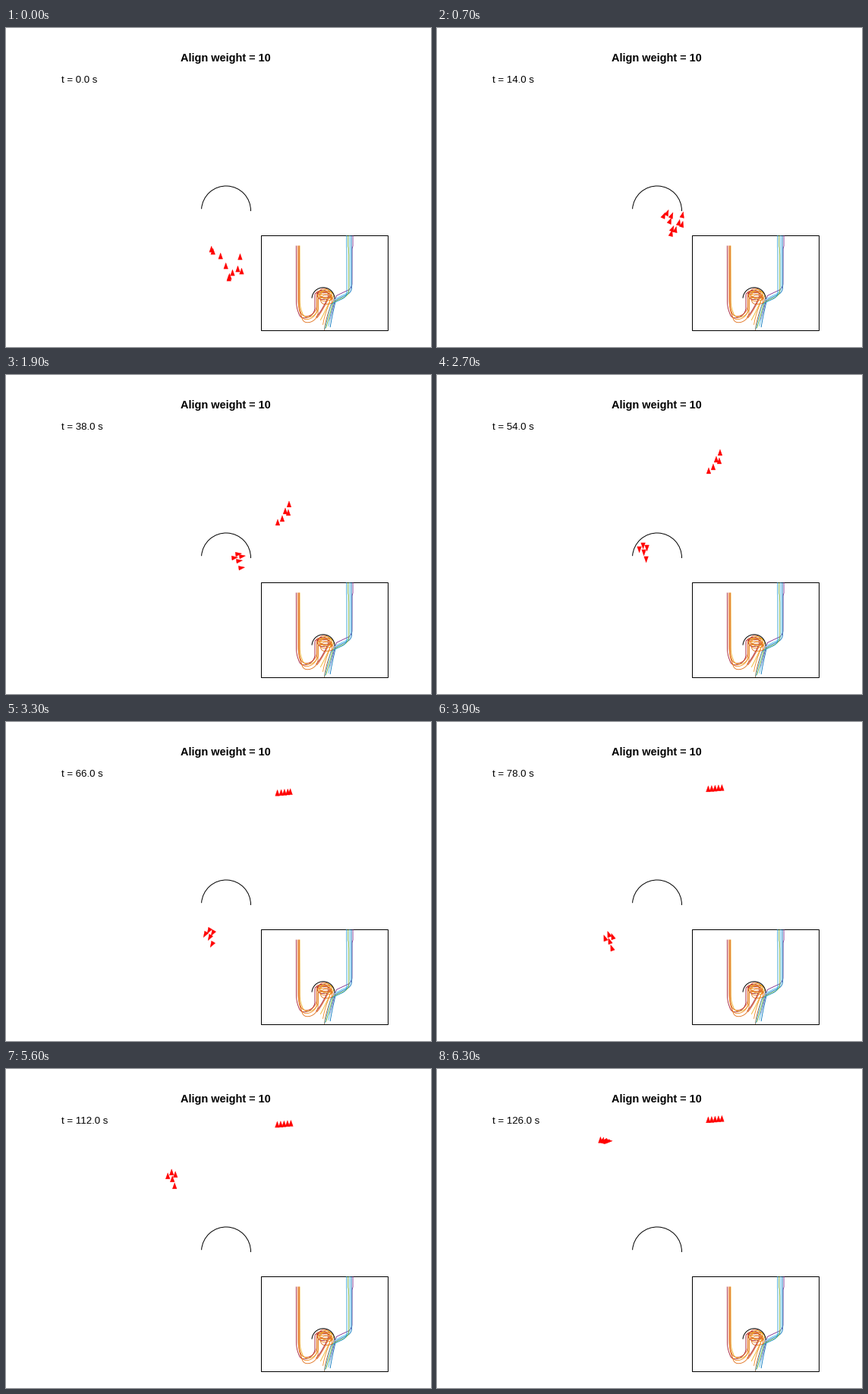
Recreate the animation shown at these times as a matplotlib script. Size 560 px wide and 420 px high, loop 6.4 s.

```python
import numpy as np
import matplotlib.pyplot as plt
from matplotlib.animation import FuncAnimation
from matplotlib.collections import PolyCollection
from matplotlib.patches import Arc, Rectangle

W, H, DPI = 560, 420, 100
FRAMES, INTERVAL = 64, 100
PX = 72 / DPI
SPEED = 8.5                    # pixels per frame
STEP = 0.25
SPRITE = np.array([[0, -4.4], [2.8, 3.5], [-2.8, 3.5]])


class Flock:
    """Five agents in formation on a path of straight and circular legs.

    Legs are (length, turn in degrees); headings run clockwise from up.
    At the end of the way the agents line up side by side.
    """

    def __init__(self, start, heading, legs, scatter, formation,
                 park, gap, rise, lineup, limit, turn):
        lengths, turns = np.transpose(legs)
        knots = np.append(0, np.cumsum(lengths))
        angles = np.radians(heading + np.append(0, np.cumsum(turns)))
        self.dist = np.arange(0, knots[-1], STEP)
        self.angle = np.interp(self.dist, knots, angles)
        self.x = start[0] + np.cumsum(np.sin(self.angle)) * STEP
        self.y = start[1] - np.cumsum(np.cos(self.angle)) * STEP

        self.scatter = np.array(scatter, float)
        self.formation = np.array(formation, float)
        self.rank = self.formation[:, 0].argsort().argsort()
        self.park_x = park + gap * self.rank
        self.rise = rise * self.rank
        self.lineup, self.limit = lineup, limit
        self.turns = np.radians(turn) * self.rank

    def along(self, t, values):
        return np.interp(SPEED * t, self.dist, values)

    def positions(self, t):
        loose = np.exp(-t / 4)
        pos = self.formation + loose * (self.scatter - self.formation)
        pos += [self.along(t, self.x), self.along(t, self.y)]
        blend = np.interp(t, self.lineup, [0, 1])
        pos[:, 0] += (self.park_x - pos[:, 0]) * blend
        pos[:, 1] = np.maximum(pos[:, 1], self.limit(t) - self.rise)
        return pos

    def headings(self, t):
        travel = self.along(t, self.angle) * min(t / 3, 1)
        return travel + self.turns * np.interp(t, self.lineup, [0, 1])

    def triangles(self, t):
        for (x, y), a in zip(self.positions(t), self.headings(t)):
            c, s = np.cos(a), np.sin(a)
            yield SPRITE @ np.array([[c, s], [-s, c]]) + [x + 0.4, y + 0.4]


looping = Flock(
    start=(281.2, 305.4), heading=23.8,
    legs=[(71.5, 0), (31.2, -113.8), (3.2, 0), (43.3, -188.2),   # first loop
          (14.3, 0), (26.7, -172), (29.7, 0), (8.5, -90),        # second loop
          (35.7, 0), (48.5, 90), (18.8, 70),                     # U-turn
          (8, 0), (29, 20), (200, 0)],
    scatter=[(-11, -14), (-9, -11), (1, -5), (8, 8), (12, 24)],
    formation=[(-6, -2), (-1, -7), (4, -4), (0, 2), (3, 11)],
    park=215, gap=2.8, rise=-0.3, lineup=[60, 63],
    limit=lambda t: 93.3, turn=22)

passing = Flock(
    start=(303, 317.4), heading=13.8,
    legs=[(69.5, 0), (10.7, 51.2), (30.6, 0), (24.9, -65), (300, 0)],
    scatter=[(5, -16), (7, 3), (2, 0), (-5, 5), (-9, 10)],
    formation=[(6, -13), (5, -2), (1, -4), (-3, 6), (-9, 11)],
    park=357, gap=4.5, rise=0.4, lineup=[27, 36],
    limit=lambda t: 88 - 0.88 * (t - 39), turn=0)

flocks = [looping, passing]

plt.rcParams["font.family"] = "Liberation Sans"
fig = plt.figure(figsize=(W / DPI, H / DPI), dpi=DPI, facecolor="white")
ax = fig.add_axes([0, 0, 1, 1])
ax.set_xlim(0, W)
ax.set_ylim(H, 0)
ax.axis("off")


def wall(x, y, r):
    ax.add_patch(Arc((x, y), 2 * r, 2 * r, theta1=184, theta2=361,
                     color="black", lw=PX, zorder=4))


def draw_inset():
    scale = 0.46
    box = Rectangle((336, 273), 167, 125, fc="white", ec="black",
                    lw=PX, zorder=2)
    ax.add_patch(box)
    palettes = [["#a2142f", "#d95319", "#edb120", "#f08a24", "#e0701a"],
                ["#7e2f8e", "#0072bd", "#4dbeee", "#77ac30", "#2a9fd6"]]
    times = np.arange(0, 60, 0.25)
    for flock, palette, top in zip(flocks, palettes, [287, 270]):
        tracks = np.array([flock.positions(t) for t in times])
        for track, tint in zip(tracks.transpose(1, 2, 0), palette):
            x = 403 + (track[0] - 257.5) * scale
            y = 342 + (track[1] - 208) * scale
            line, = ax.plot(np.append(x, x[-1]), np.append(y, top),
                            color=tint, lw=0.85 * PX, zorder=3)
            line.set_clip_path(box)
    wall(418, 356.7, 15)


ax.text(230, 44.3, "Align weight = 10", va="baseline",
        fontsize=14.55 * PX, weight="bold")
clock = ax.text(72.6, 72.3, "", va="baseline", fontsize=13.3 * PX)
wall(290, 240.5, 32.5)
draw_inset()
agents = PolyCollection([], facecolors="red", edgecolors="red",
                        linewidths=0.4 * PX, zorder=5)
ax.add_collection(agents, autolim=False)


def update(k):
    clock.set_text(f"t = {2 * k:.1f} s")
    agents.set_verts([tri for flock in flocks for tri in flock.triangles(k)])
    return clock, agents


anim = FuncAnimation(fig, update, frames=FRAMES, interval=INTERVAL, repeat=True)
plt.show()
```
